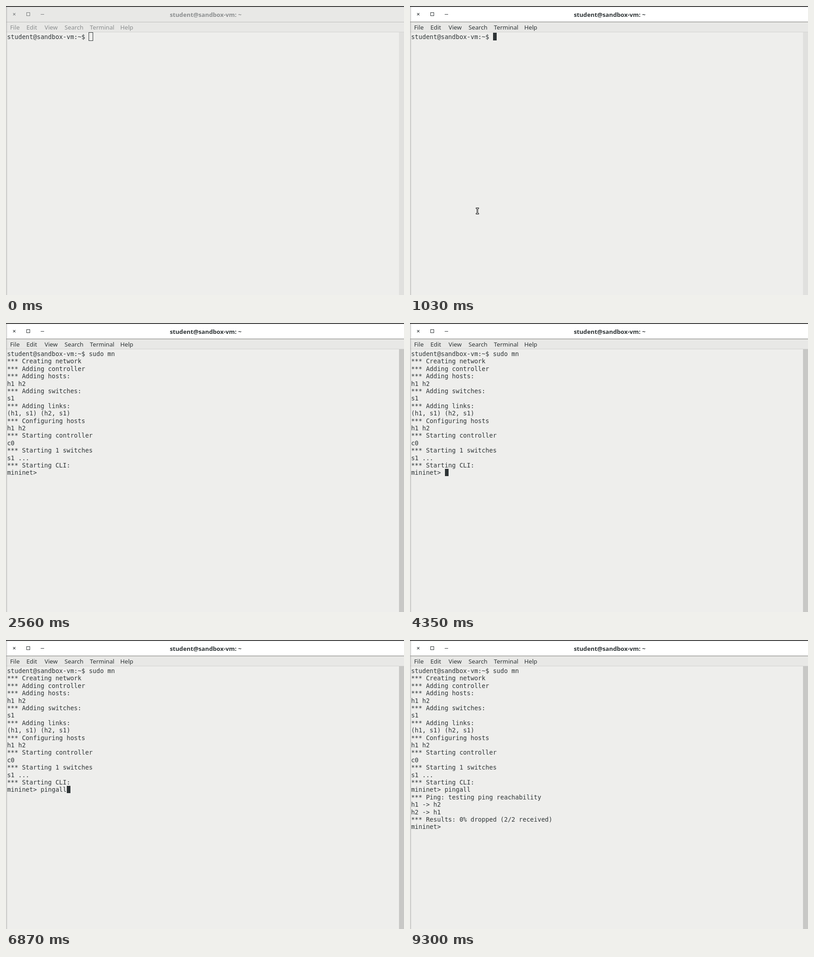
These frames come from a looping animation (877 px wide and 638 px high, 9790 ms). An HTML page:

```html
<!DOCTYPE html>
<html lang="en">
<head>
<meta charset="utf-8">
<title>Terminal</title>
<style>
  html, body { margin: 0; width: 100%; height: 100%; overflow: hidden; background: #eeeeec; }
  svg { display: block; width: 877px; height: 638px; }
  text { white-space: pre; }
  .ui { font: 13.2px "Noto Sans", "Open Sans", sans-serif; }
  .title { font-weight: 700; text-anchor: middle; }
  .term { font: 13.62px "DejaVu Sans Mono", "Liberation Mono", monospace; fill: #2e3436; }
</style>
</head>
<body>
<svg viewBox="0 0 877 638">
  <rect width="877" height="638" fill="#eeeeec"/>
  <rect id="header" y="2" width="877" height="32"/>
  <rect id="shade" y="34" width="877" height="1"/>
  <rect id="edge" y="35" width="877" height="1"/>
  <rect y="36" width="877" height="21" fill="#e8e8e6"/>
  <rect y="57" width="877" height="1" fill="#d3d3d1"/>
  <rect id="bar" x="866" y="58" width="11" height="580"/>
  <rect x="1" y="2" width="1" height="636" fill="#a9a9a8"/>
  <rect width="877" height="2" fill="#3b3b3b"/>
  <g id="chrome" class="ui">
    <g id="buttons" fill="none">
      <path d="M15.7 15.7l5 5m0-5l-5 5" stroke-width="1.1"/>
      <rect x="45.5" y="14.5" width="7" height="7"/>
      <path d="M76.5 18.5h7.5"/>
    </g>
    <text class="title" x="440" y="23.5">student@sandbox-vm: ~</text>
  </g>
  <g id="screen" class="term"></g>
  <rect id="cursor"/>
  <path id="pointer" d="M145.5 445.5h6v2h-2v10h2v2h-6v-2h2v-10h-2z" fill="#fff" stroke="#111"/>
</svg>
<script>
const LOOP = 9790, CELL = 8.2, ROW = 16.4;
const $ = id => document.getElementById(id);
const set = (el, attrs) => {
  for (const key in attrs) el.setAttribute(key, attrs[key]);
};

function addText(parent, x, y, content) {
  const el = document.createElementNS('http://www.w3.org/2000/svg', 'text');
  set(el, { x, y });
  el.textContent = content;
  parent.appendChild(el);
  return el;
}

const menu = { File: 9, Edit: 45, View: 85, Search: 129, Terminal: 184.8, Help: 251.7 };
for (const label in menu) addText($('chrome'), menu[label], 52, label);

const shell = 'student@sandbox-vm:~$ ';
const prompt = 'mininet> ';
const setup = [
  '*** Creating network', '*** Adding controller', '*** Adding hosts:', 'h1 h2',
  '*** Adding switches:', 's1', '*** Adding links:', '(h1, s1) (h2, s1)',
  '*** Configuring hosts', 'h1 h2', '*** Starting controller', 'c0',
  '*** Starting 1 switches', 's1 ...', '*** Starting CLI:'
];
const results = [
  '*** Ping: testing ping reachability', 'h1 -> h2', 'h2 -> h1',
  '*** Results: 0% dropped (2/2 received)'
];
const rows = Array.from({ length: 22 }, (_, i) => addText($('screen'), 2.4, 73 + ROW * i, ''));

// Value of the last [time, value] step that has begun.
const stepAt = (steps, t) => steps.reduce((value, [start, next]) => t >= start ? next : value, steps[0][1]);

const setupSteps = [[0, 0], [2080, 2], [2120, 6], [2160, 11], [2200, 15]];
const typedSteps = [[0, 0], [5325, 1], [5410, 2], [5580, 3], [5910, 4], [6490, 5], [6660, 6], [6870, 7]];
const blinkSteps = [
  [0, true], [2560, false], [3140, true], [3750, false], [4350, true], [4940, false],
  [5240, true], [7450, false], [8040, true], [8640, false], [8720, true], [9300, false]
];

function linesAt(t) {
  const lines = [shell + (t >= 1520 ? 'sudo mn' : '')];
  if (t < 2020) return lines;
  lines.push(...setup.slice(0, stepAt(setupSteps, t)));
  if (t < 2200) return lines.concat('');
  lines.push(prompt + 'pingall'.slice(0, stepAt(typedSteps, t)));
  if (t < 8720) return lines;
  if (t < 8800) return lines.concat(results[0], 'h1 -> ');
  return lines.concat(results, prompt);
}

const mix = (a, b, k) => `rgb(${a.map((v, i) => Math.round(v + (b[i] - v) * k))})`;

function drawChrome(t) {
  const k = Math.min(1, Math.max(0, Math.floor((t - 750) / 50) / 5));
  const ink = mix([139, 142, 143], [46, 52, 54], k);
  set($('chrome'), { fill: ink });
  set($('buttons'), { stroke: mix([120, 123, 124], [46, 52, 54], k) });
  set($('header'), { fill: mix([232, 232, 230], [255, 255, 255], k) });
  set($('shade'), { fill: mix([232, 232, 230], [205, 205, 203], k) });
  set($('edge'), { fill: mix([190, 190, 188], [157, 157, 155], k) });
  set($('bar'), { fill: t < 1130 ? '#e0e0de' : '#c8c8c6' });
}

function drawCursor(t, lines) {
  const row = lines.length - 1, col = lines[row].length;
  const left = c => Math.ceil(2.3 + CELL * c);
  const top = r => Math.ceil(59 + ROW * r);
  const x = left(col), y = top(row);
  const width = left(col + 1) - x, height = top(row + 1) - y;
  if (t < 700) {
    set($('cursor'), { x: x - 0.5, y: y - 0.5, width: width + 1, height: height + 1, fill: 'none', stroke: '#2e3436' });
  } else {
    set($('cursor'), { x, y, width, height, fill: '#2e3436', stroke: 'none' });
  }
  set($('cursor'), { visibility: stepAt(blinkSteps, t) ? 'visible' : 'hidden' });
}

function draw(t) {
  const lines = linesAt(t);
  rows.forEach((el, i) => {
    const content = lines[i] || '';
    if (el.textContent !== content) el.textContent = content;
  });
  drawChrome(t);
  drawCursor(t, lines);
  set($('pointer'), { visibility: t >= 700 && t < 1470 ? 'visible' : 'hidden' });
}

const begin = performance.now();
function tick() {
  draw((performance.now() - begin) % LOOP);
  requestAnimationFrame(tick);
}
tick();
</script>
</body>
</html>
```
